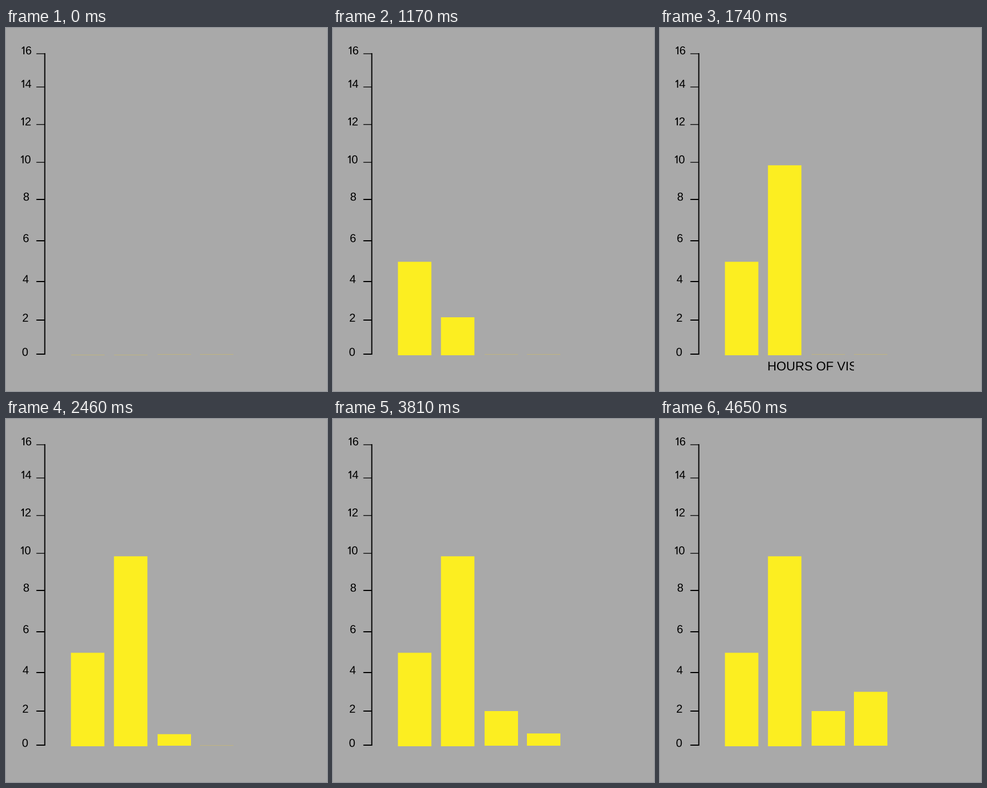
These frames come from a looping animation (576x650 px, 6030 ms). A matplotlib script:

```python
import matplotlib.pyplot as plt
import numpy as np
from matplotlib.animation import FuncAnimation
from matplotlib.patches import PathPatch, Polygon, Rectangle
from matplotlib.textpath import TextPath
from matplotlib.transforms import Affine2D

WIDTH, HEIGHT = 576, 650
FRAMES, INTERVAL = 201, 30
GREY, YELLOW, OCHRE = "#a9a9a9", "#fcee21", "#c0b47f"
PX = 0.72  # points per pixel at 100 dpi

# The hand-drawn scale is uneven, so its tick heights are given.
VALUES = np.arange(0, 17, 2)
TICK_Y = [584, 523, 454, 381, 307, 240.5, 172.8, 105.6, 46.1]

fig = plt.figure(figsize=(WIDTH / 100, HEIGHT / 100), dpi=100, facecolor=GREY)
ax = fig.add_axes([0, 0, 1, 1])
ax.set(xlim=(0, WIDTH), ylim=(HEIGHT, 0))
ax.axis("off")


def outline(text, size):
    """Text as a path with y pointing down and the baseline at the origin."""
    path = TextPath((0, 0), text, size=size, prop={"family": ["Liberation Sans"]})
    return path.transformed(Affine2D().scale(1, -1))


def add_path(path, x, y):
    moved = path.transformed(Affine2D().translate(x, y))
    return ax.add_patch(PathPatch(moved, fc="black", lw=0))


def add_line(xs, ys, weight):
    ax.plot(xs, ys, color="black", lw=weight * PX,
            solid_capstyle="butt", snap=False)


def add_digit(digit, cx, cy):
    path = outline(digit, 20.5)
    box = path.get_extents()
    add_path(path, cx - (box.x0 + box.x1) / 2, cy - (box.y0 + box.y1) / 2)


def add_one(x, cy):
    """A footless numeral one."""
    shape = [(0, -3.7), (3.6, -7), (5.1, -7), (5.1, 7),
             (3.2, 7), (3.2, -4.4), (1.1, -2.5)]
    ax.add_patch(Polygon(np.array(shape) + (x, cy), fc="black", lw=0))


def draw_axis():
    for value, y in zip(VALUES, TICK_Y):
        two_digits = value >= 10
        add_line([54.5, 70], [y, y], 1.3 if two_digits else 2)
        # Labels drift right and away from their ticks towards the top.
        cx = 34.3 + 0.26 * value + 2.1 * two_digits
        cy = y - 4 - value / 8
        add_digit(str(value % 10), cx, cy)
        if two_digits:
            add_one(cx - 12.6, cy)
    add_line([69.6, 69.6], [45, 585], 2)


class Bar:
    """A bar that grows evenly while its caption is wiped in from the left."""

    WIPE_DELAY = 5

    def __init__(self, caption, value, x, base, baseline,
                 begin, steps, speed, hide):
        self.base = base
        self.full = base - np.interp(value, VALUES, TICK_Y)
        self.begin, self.steps = begin, steps
        self.speed, self.hide = speed, hide
        self.text_x = x - 1
        ax.add_patch(Rectangle((x, base - 1), 60, 1, fc=OCHRE, lw=0))
        self.rect = ax.add_patch(
            Rectangle((x, base), 60, 0, fc=YELLOW, lw=0, snap=False))
        self.text = add_path(outline(caption, 22.5), self.text_x, baseline)

    def update(self, i):
        elapsed = i - self.begin
        height = self.full * np.clip(elapsed / self.steps, 0, 1)
        self.rect.set_y(self.base - height)
        self.rect.set_height(height)
        self.rect.set_visible(height > 0)

        shown = max(0, elapsed - self.WIPE_DELAY) * self.speed
        self.text.set_visible(shown > 0 and i < self.hide)
        self.text.set_clip_path(Rectangle((self.text_x, 590), shown, 40,
                                          transform=ax.transData))


draw_axis()
bars = [
    Bar("CUPS OF TEA", 4.97, x=116.5, base=586, baseline=614.1,
        begin=0, steps=20, speed=8.6, hide=29),
    Bar("HOURS OF VIS COMM", 9.84, x=193.7, base=586, baseline=613.1,
        begin=35, steps=20, speed=8.6, hide=74),
    Bar("HOURS OF TRAVELING", 2, x=272, base=585, baseline=612.1,
        begin=78, steps=12, speed=10.4, hide=117),
    Bar("MEALS", 3, x=348, base=585, baseline=611.1,
        begin=122, steps=22, speed=3.45, hide=155),
]


def update(i):
    for bar in bars:
        bar.update(i)
    return []


anim = FuncAnimation(fig, update, frames=FRAMES, interval=INTERVAL,
                     repeat=True, repeat_delay=0)
plt.show()
```
